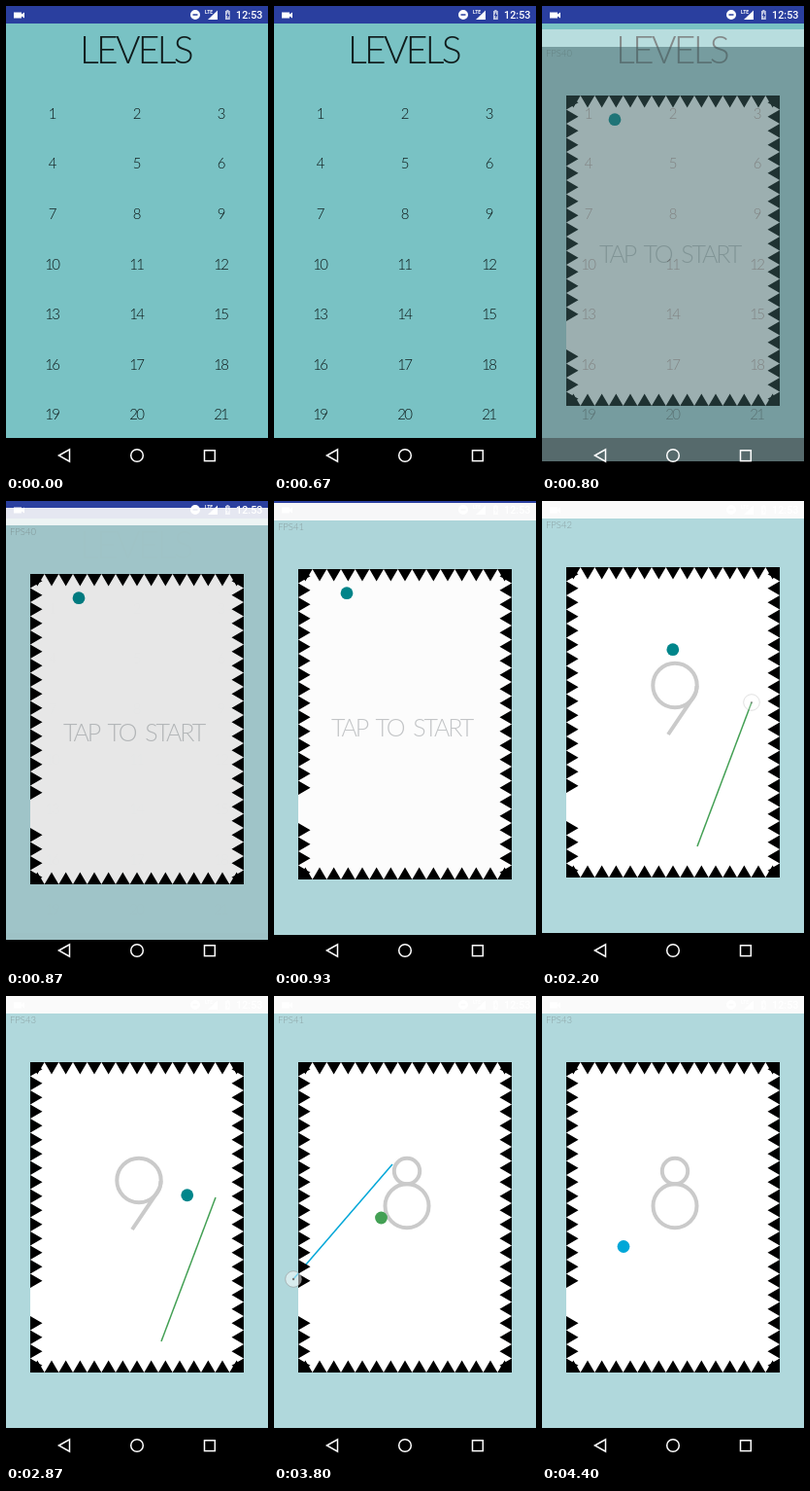
Animation of 270 by 480 pixels, one loop 4.47 s. Source, as an HTML page:

```html
<!DOCTYPE html>
<html lang="en">
<head>
<meta charset="utf-8">
<title>Levels</title>
<style>
  html, body { margin: 0; width: 100%; height: 100%; overflow: hidden; background: #000; }
  svg { display: block; width: 100vw; height: 100vh; }
  text { font-family: Lato, sans-serif; font-weight: 300; }
  .mid { text-anchor: middle; }
  .clock { font: 500 10.8px Roboto, sans-serif; }
  .lte { font: 700 5px Roboto, sans-serif; }
</style>
</head>
<body>
<svg viewBox="0 0 270 480">
  <g id="levels">
    <rect width="270" height="480" fill="#79c2c4"/>
    <rect width="270" height="18" fill="#2a3f9f"/>
    <rect y="444" width="270" height="36"/>
    <text class="mid" x="133.5" y="59.3" font-size="39" letter-spacing="-2.7" fill="#101c1c">LEVELS</text>
    <g id="numbers" class="mid" font-size="15" letter-spacing="-1.6" fill="#0c1616"></g>
  </g>

  <rect id="dim" y="18" width="270" height="426"/>
  <g id="page">
    <rect width="270" height="18" fill="#fafafa"/>
    <rect y="18" width="270" height="426" fill="#b0d8dc"/>
    <text id="fps" x="4" y="28" font-size="9.5" fill="#8a9fa1"></text>
    <rect x="25" y="68" width="220" height="319" fill="#fff"/>
    <text id="hint" class="mid" x="131.5" y="240" font-size="25" letter-spacing="-2.1" word-spacing="5" fill="#c6c8ca">TAP TO START</text>
    <g id="digits" fill="none" stroke="#cacaca" stroke-width="4">
      <g>
        <path d="M112.5 171 116.5 165V240H112.5Z" fill="#cacaca" stroke="none"/>
        <circle cx="159" cy="202.5" r="35.7"/>
      </g>
      <g>
        <circle cx="137" cy="189.5" r="22.7"/>
        <path d="M159.6 190Q159.5 196.5 156 201.5L130 240"/>
      </g>
      <g>
        <circle cx="137" cy="180" r="13.2"/>
        <circle cx="137" cy="215.7" r="22.5"/>
      </g>
    </g>
    <g id="lines" stroke-width="1.5"></g>
    <path id="spikes"/>
    <circle id="ball" r="6.4"/>
  </g>

  <g id="ring">
    <circle r="8.3" fill="#fff" fill-opacity=".5" stroke="#999" stroke-opacity=".6"/>
    <circle r="1.2" fill="#777"/>
  </g>

  <g fill="#fff" fill-rule="evenodd">
    <path d="M8 6.5h8v2l3-2v6l-3-2v2h-8z"/>
    <path d="M190 9a5 5 0 1 0 10 0a5 5 0 1 0-10 0M192.5 8.3h5v1.5h-5z"/>
    <text class="lte" x="205" y="7.5">LTE</text>
    <path d="M218 4.5V14h-10z"/>
    <path d="M226 5h1.3v-1h2.2v1h1.3v9h-4.8zM229 6l-2 4h1.3v3l2-4h-1.3z" opacity=".7"/>
    <text class="clock" x="237" y="13">12:53</text>
  </g>
  <g fill="none" stroke="#fff" stroke-width="1.5">
    <path d="M54.5 462 65.5 455.8V468.2Z"/>
    <circle cx="135" cy="462" r="6.3"/>
    <rect x="204.5" y="456.8" width="10.8" height="10.8"/>
  </g>
</svg>

<script>
const LOOP = 4470, FPS = 15;
const OPEN = 768, START = 1432;
const TEAL = '#00868b', GREEN = '#43a054', BLUE = '#00a7d8';

const $ = id => document.getElementById(id);
const set = (el, attrs) => { for (const k in attrs) el.setAttribute(k, attrs[k]); };
const add = (parent, tag, attrs) => {
  const el = document.createElementNS('http://www.w3.org/2000/svg', tag);
  set(el, attrs);
  return parent.appendChild(el);
};
const show = (el, on) => { el.style.display = on ? '' : 'none'; };
const clamp = v => Math.max(0, Math.min(1, v));
const mix = (a, b, p) => a + (b - a) * p;
const last = (rows, t) => rows.filter(r => r[0] <= t).pop();

// Finger contacts; those with a colour leave a line until the ball hits it.
const touches = [
  { from: [140, 118.5], down: 265, gone: 665 },
  { from: [146, 304], down: 1265, gone: 1735 },
  { from: [160, 355], to: [216, 207], down: 1865, up: 2170, gone: 2265, hit: 3040, color: GREEN },
  { from: [122, 173], to: [20, 291], down: 3465, up: 3765, gone: 3990, hit: 4120, color: BLUE }
];
// time, x, y, colour
const path = [
  [0, 75, 92.7, TEAL], [START, 75, 92.7, TEAL], [2870, 187, 205, TEAL],
  [3040, 200.3, 218.3, GREEN], [3800, 110.5, 228, GREEN],
  [4120, 79.5, 231.5, BLUE], [4400, 84, 257.5, BLUE], [LOOP, 85.2, 264, BLUE]
];
const rates = [[0, 40], [930, 41], [1330, 38], [1800, 42], [2400, 43], [2930, 42], [3400, 41], [4000, 43]];

function build() {
  for (let n = 1; n <= 21; n++) {
    const col = (n - 1) % 3, row = Math.floor((n - 1) / 3);
    add($('numbers'), 'text', { x: 47.3 + col * 87, y: 115.7 + row * 51.6 }).textContent = n;
  }
  // All triangles wind the same way, so overlapping corners stay solid.
  let d = '';
  const w = 220 / 15, h = 14.5, tip = 12.5;
  for (let i = 0; i < 15; i++) {
    const x = 25 + i * w;
    d += `M${x} 68h${w}l${-w / 2} ${tip}zM${x + w} 387h${-w}l${w / 2} ${-tip}z`;
  }
  for (let i = 0; i < 22; i++) {
    const y = 68 + i * h;
    if (i < 16 || i > 17) d += `M25 ${y + h}v${-h}l${tip} ${h / 2}z`;
    d += `M245 ${y}v${h}l${-tip} ${-h / 2}z`;
  }
  set($('spikes'), { d });
  for (const s of touches) {
    if (s.color) s.line = add($('lines'), 'line', { x1: s.from[0], y1: s.from[1], stroke: s.color });
  }
}

function finger(s, t) {
  const p = s.to ? clamp((t - s.down) / (s.up - s.down)) : 0;
  const to = s.to || s.from;
  return [mix(s.from[0], to[0], p), mix(s.from[1], to[1], p)];
}

function drawPage(t) {
  const left = 1 - clamp((t - OPEN) / 350);
  const lift = Math.round(38.4 * left ** 5);
  const opacity = 1 - left ** 7;
  for (const id of ['dim', 'page']) set($(id), { opacity, transform: `translate(0 ${lift})` });
}

function drawBall(t) {
  const i = path.findIndex(p => p[0] > t);
  const a = path[i - 1], b = path[i];
  const p = (t - a[0]) / (b[0] - a[0]);
  set($('ball'), { cx: mix(a[1], b[1], p), cy: mix(a[2], b[2], p), fill: a[3] });
}

function drawTouches(t) {
  let opacity = 0;
  for (const s of touches) {
    const [x, y] = finger(s, t);
    if (t >= s.down && t < s.gone) {
      opacity = clamp((s.gone - t) / 130);
      set($('ring'), { transform: `translate(${x} ${y})` });
    }
    if (s.line) {
      show(s.line, t >= s.down && t < s.hit);
      set(s.line, { x2: x, y2: y });
    }
  }
  set($('ring'), { opacity });
}

function draw(t) {
  drawPage(t);
  drawBall(t);
  drawTouches(t);
  const used = touches.filter(s => s.up <= t).length;
  [...$('digits').children].forEach((g, i) => show(g, t >= START && i === used));
  show($('hint'), t < START);
  $('fps').textContent = 'FPS' + last(rates, t)[1];
}

build();
const origin = performance.now();
function tick() {
  const t = Math.max(0, performance.now() - origin) % LOOP;
  draw(Math.floor((t + 5) * FPS / 1000) * 1000 / FPS);
  requestAnimationFrame(tick);
}
tick();
</script>
</body>
</html>
```
